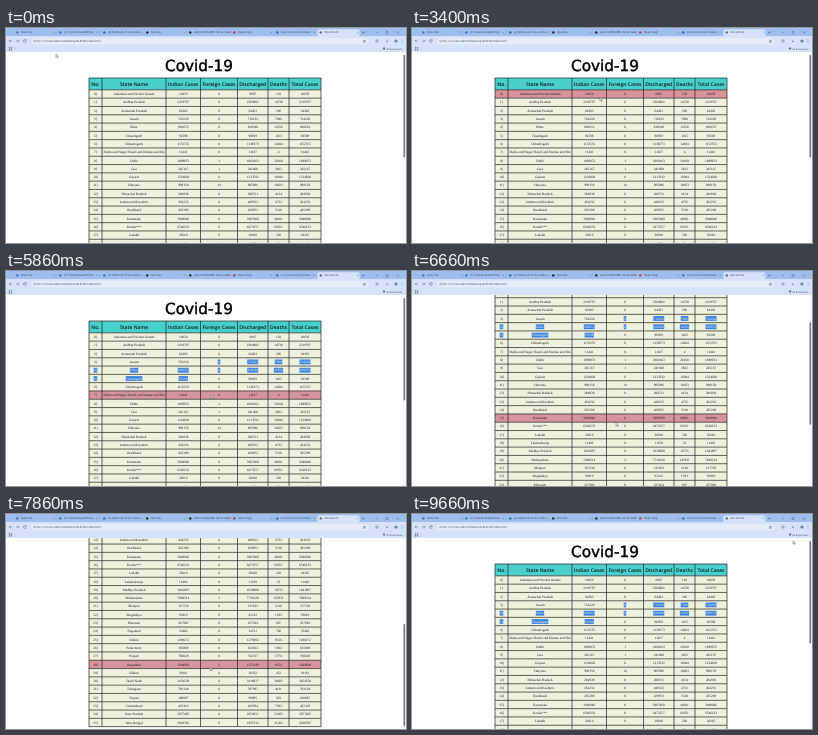
Recreate the animation shown at these times as an HTML page. Size 400x215 px, loop 9.73 s.

```html
<!DOCTYPE html>
<html lang="en">
<head>
<meta charset="utf-8">
<title>Covid-19</title>
<style>
html, body { margin: 0; width: 100%; height: 100%; overflow: hidden; background: #fff; }
svg { display: block; width: 100vw; height: 100vh; }
text { text-rendering: geometricPrecision; }
.ui { font: 2.9px "Open Sans", sans-serif; fill: #3a4659; }
.cell { font: 3.4px "Liberation Serif", serif; fill: #111; text-anchor: middle; }
.head { font: 600 5px "Open Sans", sans-serif; fill: #0b1a1a; text-anchor: middle; }
.title { font: 15.3px "DejaVu Sans", sans-serif; text-anchor: middle; fill: #000; stroke: #000; stroke-width: .45; }
.cell.on { fill: #fff; }
</style>
</head>
<body>
<svg id="stage" viewBox="0 0 400 215" preserveAspectRatio="none">
  <defs><clipPath id="view"><rect y="24" width="400" height="191"/></clipPath></defs>
  <rect width="400" height="215" fill="#fff"/>
  <g clip-path="url(#view)"><g id="page"></g></g>
  <g id="chrome"></g>
  <rect x="396.8" y="24" width="3.2" height="191" fill="#f9f9f9"/>
  <rect id="thumb" x="397.5" width="1.6" height="102.5" rx=".8" fill="#777"/>
  <path id="cursor" d="M0 0V3.6L.8 2.8L1.4 4.1L2 3.8L1.4 2.6H2.5Z" fill="#fff" stroke="#333" stroke-width=".35"/>
</svg>
<script>
const LOOP = 9730, STEP = 1000 / 15;
const TOP = 61.85, ROW = 8.3, HEAD = 50;
const EDGES = [83, 96, 160, 194.5, 231.5, 262, 283, 315];
const HEADS = ['No.', 'State Name', 'Indian Cases', 'Foreign Cases', 'Discharged', 'Deaths', 'Total Cases'];

// state, cases, discharged, deaths, foreign cases if any
const ROWS = `Andaman and Nicobar Islands,10659,9907,129
Andhra Pradesh,2319797,2304982,14730
Arunachal Pradesh,64303,64203,296
Assam,724220,716232,7986
Bihar,830653,818348,12256
Chandigarh,92598,90959,1165
Chhattisgarh,1152555,1138373,14034
Dadra and Nagar Haveli and Daman and Diu,11441,11437,4
Delhi,1899072,1868163,26168,1
Goa,245167,241608,3832,1
Gujarat,1224028,1213592,10944
Haryana,998158,985996,10623,14
Himachal Pradesh,284938,280721,4134
Jammu and Kashmir,454232,449323,4732
Jharkhand,435289,429953,5318
Karnataka,3948946,3907460,40101
Kerala***,6546233,6473557,69351
Ladakh,28216,28018,228
Lakshadweep,11402,11350,52
Madhya Pradesh,1041897,1030900,10735
Maharashtra,7889314,7731028,147831,3
Manipur,137230,135102,2120
Meghalaya,93819,92212,1593
Mizoram,227982,227204,697
Nagaland,35482,34721,760
Odisha,1288272,1279066,9126
Puducherry,165809,163832,1962
Punjab,760028,742167,17751
Rajasthan,1284918,1275149,9554,2
Sikkim,39161,38702,452
Tamil Nadu,3454558,3416027,38025
Telangana,792128,787997,4111
Tripura,100887,99965,923
Uttarakhand,437419,429594,7693
Uttar Pradesh,2077405,2052651,23493
West Bengal,2018785,1997233,21203`.split('\n').map((line, i) => {
  const [state, cases, cured, deaths, foreign = 0] = line.split(',');
  return [i + ']', state, cases, foreign, cured, deaths, cases];
});

// time, x, y
const MOVES = [
  [0, 50, 26], [60, 50, 26], [930, 188, 71], [3400, 188, 69.5], [3530, 188, 69.5], [3930, 182, 43],
  [4130, 182, 43], [4260, 212, 50], [4460, 212, 55], [4660, 211, 65], [5060, 211, 83], [5260, 211, 92],
  [5400, 207, 99], [5530, 200, 108], [5660, 196, 112], [5860, 205, 123.5], [6130, 205, 141],
  [6330, 205, 141], [6600, 204, 151.5], [7330, 204, 151.5], [7860, 204, 153], [8400, 205.5, 146],
  [8700, 205.5, 146], [9330, 370, 40], [9660, 381, 26.5]
];
const SCROLL = [[6330, 0], [7130, 103.2], [7330, 103.2], [7730, 148], [7930, 148], [8400, 19.8], [8530, 0]];

const $ = id => document.getElementById(id);
const page = $('page'), chrome = $('chrome');

function add(parent, tag, attrs, text) {
  const el = document.createElementNS('http://www.w3.org/2000/svg', tag);
  for (const k in attrs) el.setAttribute(k, attrs[k]);
  if (text !== undefined) el.textContent = text;
  return parent.appendChild(el);
}
const rect = (p, x, y, width, height, fill, rx = 0) => add(p, 'rect', { x, y, width, height, fill, rx });
const label = (p, cls, x, y, text) => add(p, 'text', { class: cls, x, y }, text);
const line = (p, d, stroke, w) => add(p, 'path', { d, stroke, 'stroke-width': w, fill: 'none' });
const mid = c => (EDGES[c] + EDGES[c + 1]) / 2;

function track(keys, t) {
  if (t <= keys[0][0]) return keys[0].slice(1);
  for (let i = 1; i < keys.length; i++) {
    const a = keys[i - 1], b = keys[i];
    if (t <= b[0]) {
      const k = (t - a[0]) / (b[0] - a[0]);
      return a.slice(1).map((v, j) => v + (b[j + 1] - v) * k);
    }
  }
  return keys[keys.length - 1].slice(1);
}

function buildChrome() {
  const bar = '#d6e2fa', ink = '#4b5668';
  rect(chrome, 0, 0, 400, 8.5, '#9fbef0');
  rect(chrome, 0, 8.2, 400, 15.8, bar);
  rect(chrome, 311.5, 1.2, 42, 8, bar, 2);
  const tabs = [
    [10, 'New Tab', '#4a6fb5'], [53, '(1) Instant Read/Write', '#2f6fd0'], [97, '(2) Methods Press Links', '#2867b2'],
    [140, 'Queries', '#222'], [183, 'admin README.md at main', '#222'], [227, 'React App', '#b33a3a'],
    [270, 'Live Score Card: React', '#2a62c9'], [313.5, 'Document', '#5f6b7c']
  ];
  tabs.forEach(([x, name, color], i) => {
    add(chrome, 'circle', { cx: x + 1.3, cy: 4.4, r: 1.2, fill: color });
    label(chrome, 'ui', x + 5, 5.4, name);
    line(chrome, `M${x + 37.5} 3.7l1.3 1.3m0-1.3l-1.3 1.3`, ink, .3);
    if (i < 6) line(chrome, `M${x + 41} 2.8v3.6`, '#7897c8', .4);
  });
  line(chrome, 'M356 4.5h2.6m-1.3-1.3v2.6M370 4.5h2M380 3.5h2v2h-2zM391 3.5l2 2m0-2l-2 2', ink, .4);
  line(chrome, 'M6 13H3.2m1.2-1.2L3.2 13l1.2 1.2M10 13h2.8m-1.2-1.2l1.2 1.2l-1.2 1.2M20 12.2a1.4 1.4 0 1 0 .1 1.4M20.2 11.4v1.2H19', ink, .45);
  rect(chrome, 25.5, 10, 337, 6.3, '#e6edf9', 3.1);
  add(chrome, 'circle', { cx: 28.5, cy: 13.1, r: .9, fill: 'none', stroke: ink, 'stroke-width': .35 });
  label(chrome, 'ui', 30.3, 14.1, 'File');
  label(chrome, 'ui', 36.5, 14.1, 'C:/Users/admin/Desktop/D-EHA/index.html');
  line(chrome, 'M358.5 11.8l.4 1h1l-.8.7l.3 1l-1-.6l-1 .6l.3-1l-.8-.7h1zM370 12h2v2h-2zM381 12v2m-1-.8l1 .8l1-.8', ink, .4);
  add(chrome, 'circle', { cx: 390, cy: 13, r: 1.6, fill: '#6680a8' });
  line(chrome, 'M396 11.7v.5m0 .6v.5m0 .6v.5', ink, .6);
  line(chrome, 'M3 19.3h1v1H3zM5 19.3h1v1H5zM3 21.3h1v1H3zM5 21.3h1v1H5z', ink, .4);
  line(chrome, 'M9 18.7v4', '#a9bbda', .4);
  rect(chrome, 377, 19.6, 2.2, 1.8, '#667284', .3);
  const marks = label(chrome, 'ui', 380.5, 21.6, 'All Bookmarks');
  marks.style.fontSize = '2.4px';
}

let head, bars, cells;
function buildPage() {
  const bottom = TOP + ROW * ROWS.length;
  label(page, 'title', 193, 43.2, 'Covid-19');
  head = rect(page, 83, HEAD, 232, TOP - HEAD, '#48d1cc');
  bars = ROWS.map((_, i) => rect(page, 83, TOP + i * ROW, 232, ROW, '#f0f1dd'));
  let d = `M83 ${HEAD}H315`;
  for (let i = 0; i <= ROWS.length; i++) d += `M83 ${TOP + i * ROW}H315`;
  EDGES.forEach(x => d += `M${x} ${HEAD}V${bottom}`);
  line(page, d, '#222', .7);
  HEADS.forEach((h, c) => label(page, 'head', mid(c), 57.7, h));
  cells = ROWS.map((row, i) => row.map((text, c) => {
    const y = TOP + (i + .5) * ROW;
    const mark = rect(page, 0, y - 2.4, 0, 4.8, '#3b82e0');
    const el = label(page, 'cell', mid(c), y + 1.1, text);
    const w = el.getComputedTextLength() + .8;
    mark.setAttribute('x', mid(c) - w / 2);
    mark.setAttribute('width', w);
    mark.setAttribute('visibility', 'hidden');
    return { mark, el };
  }));
}

// Dragging selects cells in reading order, from Assam's foreign cases on.
const SEL_START = 3 * 7 + 3;
function selectionEnd(t) {
  if (t < 5330) return -1;
  if (t < 5400) return SEL_START;
  if (t < 5530) return 4 * 7 + 3;
  return 5 * 7 + 2;
}

function draw(time) {
  const t = Math.floor((time + 7) / STEP) * STEP;
  const [x, y] = track(MOVES, t);
  const [scroll] = track(SCROLL, t);
  const over = t >= 3390 && x > 83 && x < 315 && y > 27;
  const hot = y - 3 + scroll;
  const row = over ? Math.floor((hot - TOP) / ROW) : -9;
  const end = selectionEnd(t);

  page.setAttribute('transform', `translate(0 ${-scroll})`);
  head.setAttribute('fill', over && hot > HEAD && hot < TOP ? '#d8949c' : '#48d1cc');
  bars.forEach((b, i) => b.setAttribute('fill', i === row ? '#d8949c' : '#f0f1dd'));
  for (let i = 3; i < 6; i++) cells[i].forEach(({ mark, el }, c) => {
    const n = i * 7 + c, on = n >= SEL_START && n <= end;
    mark.setAttribute('visibility', on ? 'visible' : 'hidden');
    el.classList.toggle('on', on);
  });
  $('thumb').setAttribute('y', 27 + scroll * .56);
  $('cursor').setAttribute('transform', `translate(${x} ${y})`);
}

buildChrome();
buildPage();

const start = performance.now();
function tick() {
  draw((performance.now() - start) % LOOP);
  requestAnimationFrame(tick);
}
tick();
</script>
</body>
</html>
```
